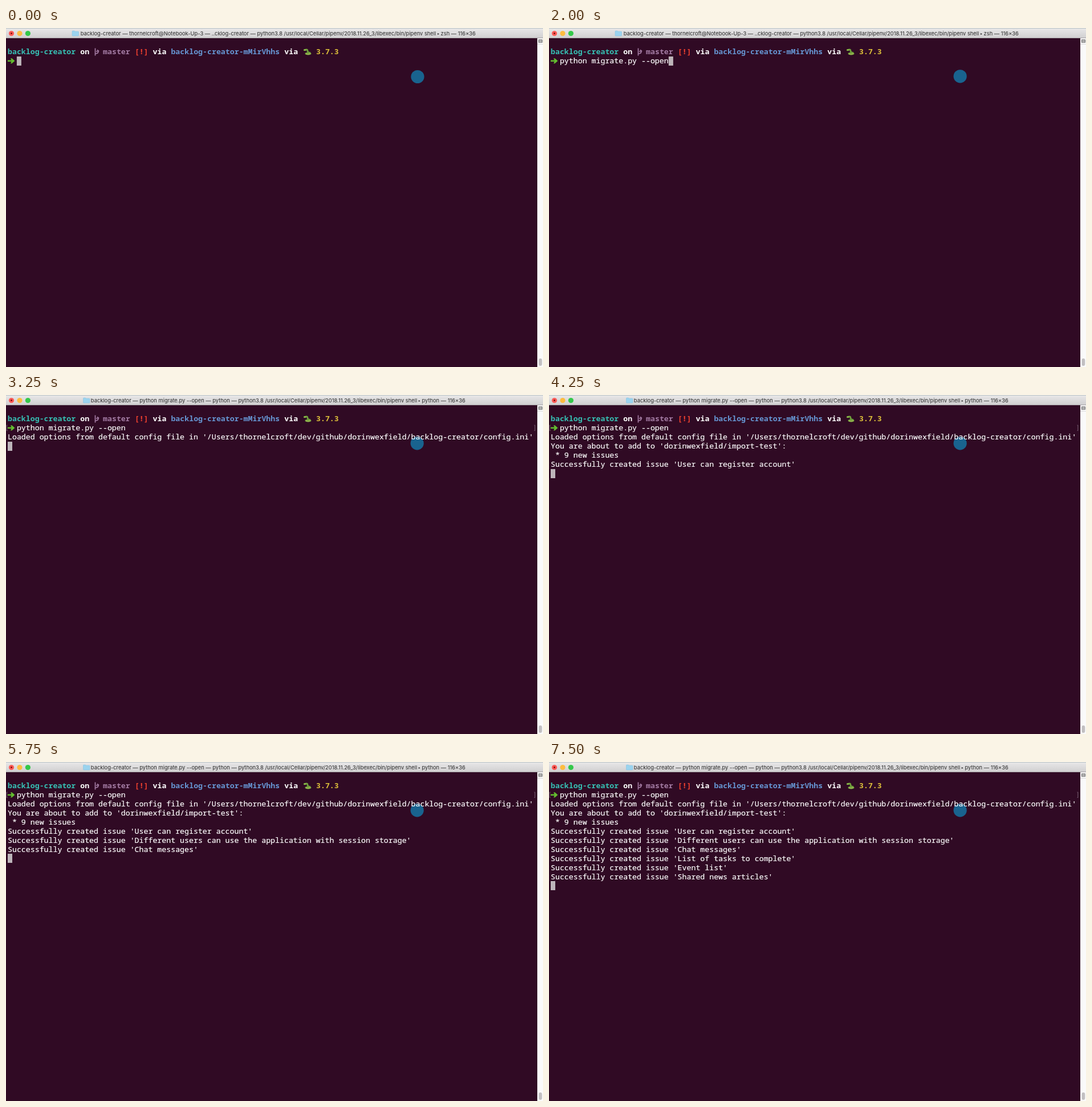
An HTML page for the animation above (8000 ms loop, 942 by 595 pixels).

```html
<!DOCTYPE html>
<html lang="en">
<head>
<meta charset="utf-8">
<title>Terminal</title>
<style>
  html, body { margin: 0; width: 100%; height: 100%; overflow: hidden; background: #300a24; }
  svg { display: block; }
  text { white-space: pre; }
  .term { font: 500 13.26px "Noto Sans Mono", "DejaVu Sans Mono", monospace; fill: #fff; stroke: #fff; stroke-width: .2; font-variant-ligatures: none; }
  .prompt { font-weight: 700; stroke: none; }
  #title { font: 9.34px Inter, Roboto, sans-serif; fill: #2a2a2a; text-anchor: middle; }
</style>
</head>
<body>
<svg width="942" height="595" viewBox="0 0 942 595">
  <defs>
    <linearGradient id="bar" x2="0" y2="1">
      <stop stop-color="#e9e8e9"/><stop offset="1" stop-color="#d0cfd0"/>
    </linearGradient>
  </defs>
  <rect width="942" height="595" fill="#300a24"/>

  <!-- title bar -->
  <rect width="942" height="17.5" fill="url(#bar)"/>
  <rect width="942" height="1" fill="#b9c3c6"/>
  <rect y="17" width="942" height="1" fill="#a9a5a8"/>
  <circle cx="9.5" cy="9.5" r="4.6" fill="#fc5b57"/>
  <circle cx="9.5" cy="9.5" r="1.4" fill="#7e0d09"/>
  <circle cx="24" cy="9.5" r="4.6" fill="#fdbc40"/>
  <circle cx="38.4" cy="9.5" r="4.6" fill="#34c84a"/>
  <path id="folder" d="M0 6q0-1 1-1h3l1 1h5.500q1 0 1 1v6q0 1-1 1H1q-1 0-1-1z" fill="#9bd3ee" stroke="#7fbfe0" stroke-width=".5"/>
  <text id="title" x="477.3" y="13"><tspan id="path"></tspan><tspan font-size="6" dy="-.8">▸</tspan><tspan id="job" dy=".8"></tspan></text>

  <!-- scroll bar -->
  <rect x="932" y="18" width="10" height="577" fill="#fafafa"/>
  <rect x="932" y="28" width="10" height=".8" fill="#d4d2d4"/>
  <path d="M934.500 20.500h6v5h-6zM934.500 22.200h6M934.500 23.800h6" fill="none" stroke="#555" stroke-width=".8"/>
  <rect x="934.500" y="580" width="5.800" height="13" rx="2.900" fill="#c2c0c2"/>

  <circle id="pointer" fill="#19638f"/>

  <!-- prompt -->
  <g id="prompt" class="term prompt"></g>
  <path d="M156.500 35.500V48.500M156.500 45Q162 45 162 41H158M160 38.300L163 41" fill="none" stroke="#a37ba3" stroke-width="1.700"/>
  <g fill="none" stroke-linecap="round">
    <ellipse cx="530" cy="45" rx="5.500" ry="2.500" fill="#6f9f3c"/>
    <path d="M523.500 38.800Q529 36.500 529 40T533 43.500" stroke="#6f9f3c" stroke-width="2.800"/>
    <path d="M526 45.500Q530 47 534 45" stroke="#c9cf6a" stroke-width=".9"/>
    <path d="M523.500 38.500h2" stroke="#8cba4a" stroke-width="2.600"/>
  </g>
  <path d="M3 56.600H9.500L8 53.300H10.300L15.500 57.800L10.300 62.300H8L9.500 59H3z" fill="#63bd2f"/>
  <path id="marks" d="M2.500 53H1.200V62.500H2.500M926.500 53H927.800V62.500H926.500" fill="none" stroke="#80687a" stroke-width=".9"/>

  <text id="command" class="term" x="18.900" y="62.300"></text>
  <g id="output" class="term"></g>
  <rect id="cursor" width="8" height="16" fill="#bdb5ba"/>
</svg>
<script>
const $ = id => document.getElementById(id);
const LOOP = 8000, LEFT = 3, COL = 7.956, ROW = 15.92;

const setAttrs = (el, attrs) => {
  for (const key in attrs) el.setAttribute(key, attrs[key]);
};
const addText = (parent, str, attrs) => {
  const el = document.createElementNS(parent.namespaceURI, "text");
  el.textContent = str;
  setAttrs(el, attrs);
  return parent.appendChild(el);
};

// column, text, colour
[
  [0, "backlog-creator", "#36c0b4"],
  [16, "on", "#fff"],
  [21, "master", "#a37ba3"],
  [28, "[!]", "#f0402f"],
  [32, "via", "#fff"],
  [36, "backlog-creator-mMirVhhs", "#6696d3"],
  [61, "via", "#fff"],
  [68, "3.7.3", "#dcbf3a"]
].forEach(([col, str, fill]) => addText($("prompt"), str, { x: LEFT + col * COL, y: 46.3, fill }));

// start time, text
const created = name => `Successfully created issue '${name}'`;
const lines = [
  [3250, "Loaded options from default config file in '/Users/thornelcroft/dev/github/dorinwexfield/backlog-creator/config.ini'"],
  [3750, "You are about to add to 'dorinwexfield/import-test':"],
  [3750, " * 9 new issues"],
  [4250, created("User can register account")],
  [5000, created("Different users can use the application with session storage")],
  [5750, created("Chat messages")],
  [6250, created("List of tasks to complete")],
  [7000, created("Event list")],
  [7500, created("Shared news articles")]
].map(([start, str], i) => ({ start, el: addText($("output"), str, { x: LEFT, y: 62.3 + (i + 1) * ROW }) }));

// start time, x, y, radius; larger while pressed
const pointer = [
  [0, 722, 85.5, 11.6],
  [500, 721.4, 96, 15.7],
  [750, 721.1, 96, 15.5],
  [1000, 721, 95.7, 15.3],
  [1250, 721.2, 84.8, 11.6]
];

const command = "python migrate.py --open";
const idlePath = "thornelcroft@Notebook-Up-3 — ..cklog-creator";
const busyPath = `${command} — python`;

function draw(t) {
  const running = t >= 3000;
  const typed = t < 1500 ? 0 : t < 2000 ? 1 : command.length;
  const shown = lines.filter(line => t >= line.start).length;

  $("path").textContent = `backlog-creator — ${running ? busyPath : idlePath} — python3.8 /usr/local/Cellar/pipenv/2018.11.26_3/libexec/bin/pipenv shell `;
  $("job").textContent = ` ${running ? "python" : "zsh"} — 116×36`;
  setAttrs($("folder"), { transform: `translate(${running ? 135.5 : 116} 0)` });
  setAttrs($("marks"), { visibility: running ? "visible" : "hidden" });
  $("command").textContent = command.slice(0, typed);
  lines.forEach((line, i) => setAttrs(line.el, { visibility: i < shown ? "visible" : "hidden" }));
  setAttrs($("cursor"), {
    x: running ? LEFT : LEFT + (2 + typed) * COL,
    y: Math.round(running ? 50 + (shown + 1) * ROW : 50)
  });

  const [, cx, cy, r] = pointer.filter(p => t >= p[0]).pop();
  setAttrs($("pointer"), { cx, cy, r });
}

const origin = performance.now();
function tick() {
  draw((performance.now() - origin) % LOOP);
  requestAnimationFrame(tick);
}
tick();
</script>
</body>
</html>
```
